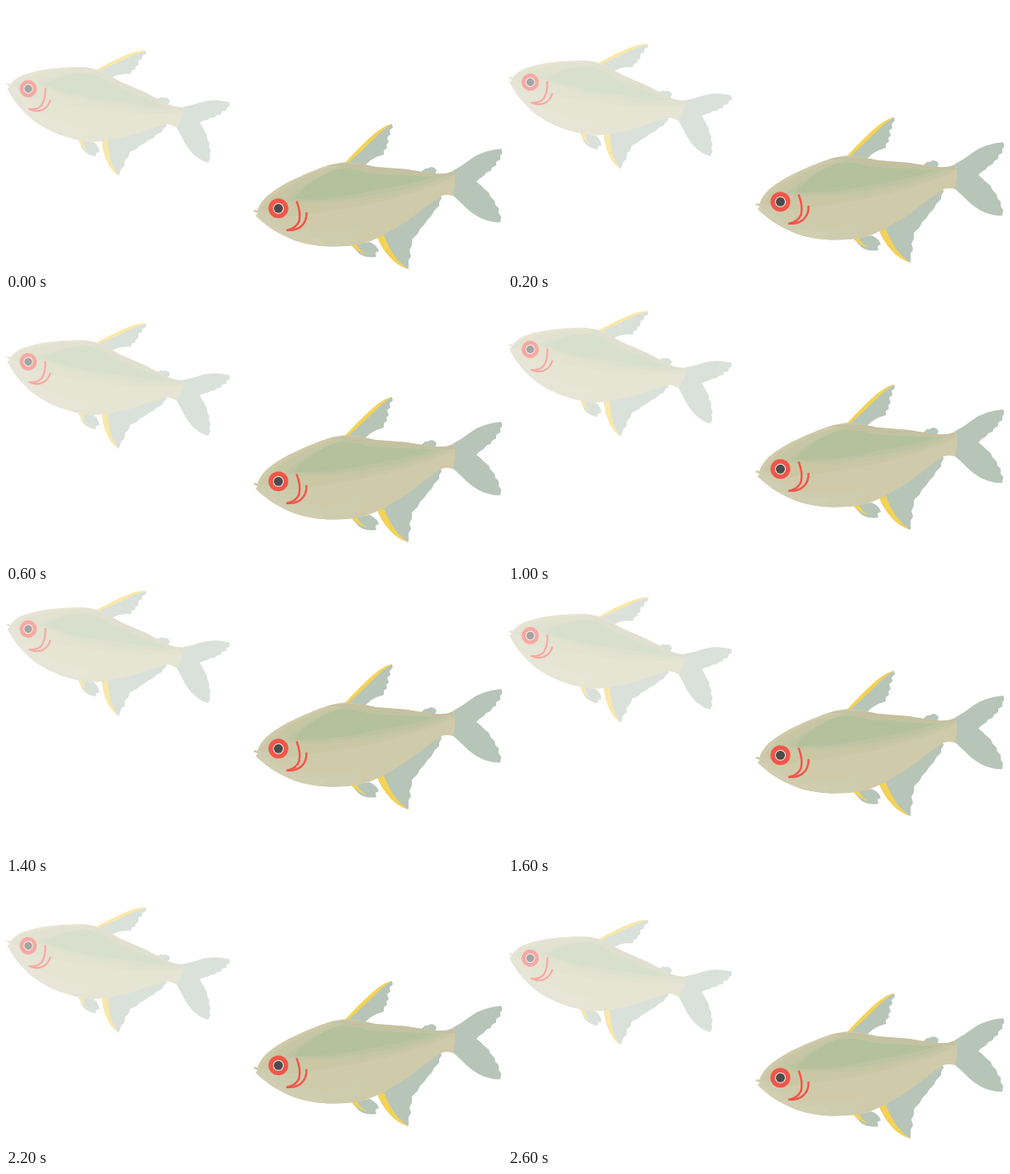
An HTML page that plays this animation: 600 px wide and 320 px high, repeating every 2.8 s.

```html
<!DOCTYPE html>
<html lang="en">
<head>
<meta charset="utf-8">
<title>Two fish</title>
<style>
  html, body { margin: 0; width: 100%; height: 100%; overflow: hidden; background: #fff; }
  svg { display: block; }
  .fin { fill: #b7c5b8; }
  .ray { fill: #f5d253; }
  .gill { fill: none; stroke: #f1564a; stroke-width: 2.5; }
</style>
</head>
<body>
<svg width="600" height="320" viewBox="0 0 600 320">
  <defs>
    <clipPath id="skin">
      <path id="outline" d="M299 249 L301 247 L304 248 Q307 239 315 231 Q327 221 342 213 Q360 204 381 196 Q398 190 413 189 Q430 191 447 195 L485 198 Q508 202 522 203.500 Q533 204 541 200 Q544 208 543 218 L541 230 Q532 228 527 230 Q517 236 503 247 Q485 262 468 271 Q449 283 432 288 Q412 292 390 291.500 Q366 290 349 284 Q332 277 320 269 Q309 261 302 254 L305 251 Z"/>
    </clipPath>
    <g id="fish">
      <g class="fin">
        <path d="M411 190 Q436 163 450 152 Q460 144 467 143 L468 147 L464 151 L465 156 L461 159 L463 165 L460 168 L461 172 L457 175 L457 180 L448 183 L441 187 L433 194 Z"/>
        <path d="M501 202 L507 197 L510 197 L514 195 L518 196 L521 199 L518 206 Z"/>
        <path d="M540 200 Q553 193 563 185 Q577 175 599 173 L601 178 L598 181 L598 186 L593 189 L593 193 L588 196 L586 200 L581 202 L578 206 L573 209 L569 213 L574 217 L579 222 L584 226 L586 231 L591 236 L592 241 L596 245 L596 251 L599 255 L598 262 Q586 263 572 256 Q560 249 552 240 L540 229 Z"/>
        <path d="M449 280 L460 272 L500 244 L526 230 L527 233 L524 238 L524 242 L518 248 L515 254 L510 259 L506 265 L501 270 L498 276 L491 283 L491 290 L488 296 L490 303 L487 308 L487 319 Q474 315 465 305 Q454 293 449 280 Z"/>
        <path d="M418 290 L440 286 Q449 290 451 297 L447 299 L448 304 Q435 306 427 300 Z"/>
      </g>
      <g class="ray">
        <path d="M410 190 Q435 163 449 152 Q460 144 467 143 Q455 150 446 160 Q431 175 414 190 Z"/>
        <path d="M449 279 L457 278 Q464 296 473 307 Q480 315 487 319 Q473 315 464 304 Q453 292 449 279 Z"/>
        <path d="M418 290 L424 289 L429 296 L436 301 Q427 299 418 290 Z"/>
      </g>
      <use href="#outline" fill="#cfcaa9"/>
      <g clip-path="url(#skin)">
        <path fill="#cbc7a5" d="M300 260 Q325 210 410 191 L544 208 Q490 230 440 240 Q380 252 300 260 Z"/>
        <path fill="#c5c6a4" d="M322 236 Q348 209 410 192 L544 205 Q502 224 450 233 Q388 244 322 236 Z"/>
        <path fill="#bec4a1" d="M338 235 Q364 209 414 193 L530 206 Q505 220 450 228 Q390 240 338 235 Z"/>
        <path fill="#b4c19c" d="M347 234 Q370 209 398 199 Q416 195 440 203 L517 207 Q500 215 452 222 Q398 236 347 234 Z"/>
        <path fill="#c4c1a0" d="M380 194 Q413 188 447 194 L541 201 L541 206 Q505 206 475 203 Q442 203 412 194 Z"/>
        <path fill="#ceccaf" d="M300 250 Q315 245 330 258 Q347 273 379 274 Q407 277 432 268 L415 293 L340 290 Z"/>
        <path fill="#d1cdb0" d="M300 251 Q318 257 334 271 Q352 281 390 282 L380 293 L330 290 Z"/>
      </g>
      <circle cx="329.500" cy="245.300" r="12" fill="#f1564a"/>
      <circle cx="329.500" cy="245.300" r="6.500" fill="#f4f0e6"/>
      <circle cx="329.500" cy="245.300" r="5.500" fill="#4c4c4c"/>
      <path class="gill" d="M351.500 236.500 Q357 250 354.500 261 Q351 269 341 271.500"/>
      <path class="gill" d="M363.500 250 Q364 261 357 267 Q350 273 339 271.500"/>
    </g>
  </defs>
  <g id="school">
    <use href="#fish" opacity=".5" transform="translate(27 100) rotate(18.850) scale(.875) translate(-329.500 -245)"/>
    <use href="#fish"/>
  </g>
</svg>
<script>
  const school = document.getElementById('school');
  const STEP = 200, HALF = 7, RISE = 7.5;

  function draw(now) {
    const step = Math.floor(now / STEP) % (2 * HALF);
    const height = HALF - Math.abs(HALF - step);
    school.setAttribute('transform', `translate(0 ${-Math.round(height * RISE)})`);
    requestAnimationFrame(() => draw(performance.now()));
  }
  draw(0);
</script>
</body>
</html>
```
